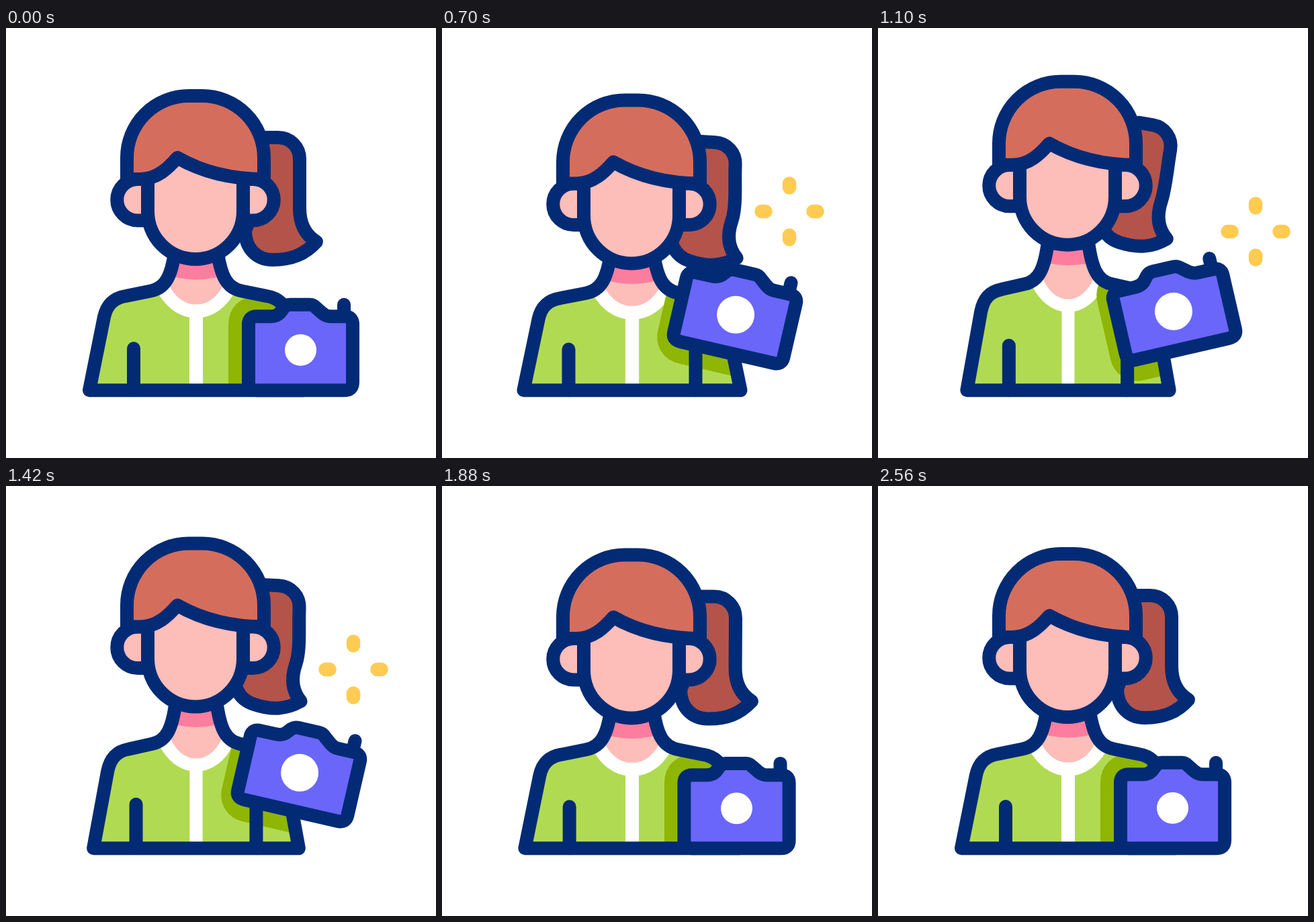
These frames come from a looping animation (640x640 px, 2.84 s). An HTML page with a canvas:

```html
<!DOCTYPE html>
<html lang="en">
<head>
<meta charset="utf-8">
<title>Photographer</title>
<style>
  html, body { margin: 0; width: 100%; height: 100%; overflow: hidden; background: #fff; }
  canvas { display: block; width: 100vw; height: 100vh; }
</style>
</head>
<body>
<canvas id="stage" width="640" height="640"></canvas>
<script>
const ctx = document.getElementById('stage').getContext('2d');
const LOOP = 2840, STEP = 20, LINE = 20, FLOOR = 539.3;
const COLOR = {
  ink: '#032b75', hair: '#d56d5d', tail: '#b4534a', skin: '#fdbdb9', blush: '#fd7d9f',
  shirt: '#b1da53', shade: '#8fb505', camera: '#6a66f9', flash: '#ffcb52', white: '#fff'
};

// [ms, crouch]: 1 is the deepest crouch, negative values stretch upwards.
const BOUNCE = [[220, 0], [460, 1], [700, 0.17], [1310, -0.7], [1665, 0.58], [2050, -0.34], [2540, 0]];
const CLICKS = [700, 1100, 1400];

const COLLAR = 'C245 408 262 421.5 283 421.5 S321 408 332 388';
const BODY = new Path2D(`M124 ${FLOOR} L146 430 C150 412 160 402 178 399 L215 391.5 C238 387 246 368 251 335` +
  `H315 C320 368 328 387 351 391.5 L388 399 C406 402 416 412 420 430 L442 ${FLOOR} Z`);
const SHIRT = new Path2D('M0 388 H234' + COLLAR + 'H640 V640 H0 Z');
const COLLAR_LINE = new Path2D('M234 388' + COLLAR + 'M283 421 V540');
const ARMS = new Path2D(`M190 477 V${FLOOR} M376 477 V${FLOOR}`);

// Centred on the camera body.
const CAMERA = new Path2D('M-65.5 -55 H-44 Q-36 -55 -31 -60 L-25 -68 Q-21 -72.5 -16 -72.5 H14' +
  'Q19 -72.5 23 -68 L32 -60 Q38 -55 44 -55 H65.5 Q77.5 -55 77.5 -43 V43 Q77.5 55 65.5 55' +
  'H-65.5 Q-77.5 55 -77.5 43 V-43 Q-77.5 -55 -65.5 -55 Z');
const BUTTON = new Path2D('M64.5 -72.5 V-55');

const radians = degrees => degrees * Math.PI / 180;
const clamp01 = v => Math.max(0, Math.min(1, v));
const mix = (a, b, k) => a + (b - a) * k;

function ease(t, from, to) {
  const u = clamp01((t - from) / (to - from));
  return u * u * (3 - 2 * u);
}

const pulse = (t, a, b, c, d) => ease(t, a, b) - ease(t, c, d);

// Smooth curve through the key points, level at each extreme.
function sample(keys, t) {
  const last = keys.length - 1;
  if (t <= keys[0][0]) return keys[0][1];
  if (t >= keys[last][0]) return keys[last][1];
  const i = keys.findIndex(key => key[0] > t) - 1;
  const slope = k => (keys[k + 1][1] - keys[k][1]) / (keys[k + 1][0] - keys[k][0]);
  const tangent = k => {
    if (k === 0 || k === last) return 0;
    const a = slope(k - 1), b = slope(k);
    return a * b <= 0 ? 0 : 2 * a * b / (a + b);
  };
  const [t0, v0] = keys[i], [t1, v1] = keys[i + 1];
  const d = t1 - t0, u = (t - t0) / d, u2 = u * u, u3 = u2 * u;
  return v0 + (v1 - v0) * (3 * u2 - 2 * u3) +
    d * (tangent(i) * (u3 - 2 * u2 + u) + tangent(i + 1) * (u3 - u2));
}

function pose(t) {
  const crouch = sample(BOUNCE, t);
  const raise = pulse(t, 460, 690, 1440, 1650);
  const lean = pulse(t, 860, 1070, 1200, 1370);
  const side = raise * (1 - 2 * lean);
  const recoil = (1 - raise) * crouch * (crouch < 0 ? 2.4 : 1);
  const restH = 1 - 0.09 * Math.tanh(2.5 * crouch);
  return {
    head: 38 * crouch,
    nod: 11 * recoil,
    width: 1 + 0.094 * crouch,
    height: 1 - 0.127 * crouch,
    swing: 8.5 * recoil + raise * (3 + 7 * lean),
    bend: 9 * recoil + raise * (16 - 8 * lean),
    camX: 438.5 - 2.5 * side,
    camY: mix(FLOOR - 55 * restH, 429 + 2.5 * side, raise),
    camW: mix(restH ** -0.85, 1.08, raise),
    camH: mix(restH, 0.96, raise),
    camTurn: 13 * side,
    lens: mix(23.5, 28, raise) - 6 * pulse(t, 220, 460, 460, 640)
  };
}

function place(path, matrix) {
  const placed = new Path2D();
  placed.addPath(path, matrix);
  return placed;
}

function fill(path, color) {
  ctx.fillStyle = color;
  ctx.fill(path);
}

function stroke(path, color = COLOR.ink, width = LINE) {
  ctx.strokeStyle = color;
  ctx.lineWidth = width;
  ctx.stroke(path);
}

function shape(path, color) {
  fill(path, color);
  stroke(path);
}

function rotate([x, y], cx, cy, degrees) {
  const c = Math.cos(radians(degrees)), s = Math.sin(radians(degrees));
  return [cx + (x - cx) * c - (y - cy) * s, cy + (x - cx) * s + (y - cy) * c];
}

function drawBody(p, shadow) {
  const matrix = new DOMMatrix([p.width, 0, 0, p.height, 283 * (1 - p.width), FLOOR * (1 - p.height)]);
  const body = place(BODY, matrix);
  const h = p.head;

  ctx.save();
  ctx.clip(body);
  fill(body, COLOR.skin);
  fill(new Path2D(`M230 ${300 + h} V${364 + h} Q283 ${385 + h} 336 ${364 + h} V${300 + h} Z`), COLOR.blush);
  fill(place(SHIRT, matrix), COLOR.shirt);
  stroke(place(COLLAR_LINE, matrix), COLOR.white, LINE * p.width);
  stroke(shadow, COLOR.shade, LINE * 3);
  fill(shadow, COLOR.shade);
  ctx.restore();

  stroke(place(ARMS, matrix));
  stroke(body);
}

function drawTail(p) {
  const top = (x, y) => {
    const [px, py] = rotate([x, y], 392, 188, p.swing);
    return [px, py + p.head];
  };
  const tip = (x, y) => top(...rotate([x, y], 400, 270, p.bend));
  const tail = new Path2D();
  tail.moveTo(...top(384, 163));
  tail.lineTo(...top(405, 163));
  tail.bezierCurveTo(...top(423, 163), ...top(437, 177), ...top(437, 195));
  tail.bezierCurveTo(...top(437, 220), ...tip(437, 245), ...tip(437, 268));
  tail.bezierCurveTo(...tip(437, 293), ...tip(447, 309), ...tip(462, 318));
  tail.bezierCurveTo(...tip(445, 337), ...tip(425, 345), ...tip(397, 345));
  tail.bezierCurveTo(...tip(372, 345), ...tip(356, 327), ...tip(356, 302));
  tail.lineTo(...top(376, 250));
  shape(tail, COLOR.tail);
}

function drawHead(p) {
  const h = p.head, brow = 225 + h + p.nod, peak = 193 + h + p.nod * 1.7;
  const ears = new Path2D(`M211 ${brow} H196 a30.75 30.75 0 0 0 0 61.5 H211 Z` +
    `M353 ${brow} H368 a30.75 30.75 0 0 1 0 61.5 H353 Z`);
  const face = new Path2D(`M211 ${brow - 28} V${272.5 + h} A71 71.5 0 0 0 353 ${272.5 + h} V${brow - 28}`);
  const hair = new Path2D(`M180 ${brow} V${193 + h} A92 92 0 0 1 272 ${101 + h} H292` +
    `A92 92 0 0 1 384 ${193 + h} V${brow} C330 ${brow} 290 ${peak + 20} 255 ${peak}` +
    `C242 ${peak + 15} 225 ${brow} 200 ${brow} Z`);
  shape(ears, COLOR.skin);
  shape(face, COLOR.skin);
  shape(hair, COLOR.hair);
}

function drawCamera(p, matrix) {
  stroke(place(BUTTON, matrix));
  shape(place(CAMERA, matrix), COLOR.camera);
  const { x, y } = matrix.transformPoint(new DOMPoint(0, -5));
  const lens = new Path2D();
  lens.arc(x, y, p.lens, 0, Math.PI * 2);
  fill(lens, COLOR.white);
}

function drawFlash(click, index, t) {
  const size = clamp01((90 - Math.abs(t - click)) / 50);
  if (size === 0) return;
  const x = index % 2 ? 562 : 517, y = index % 2 ? 303 : 273;
  const near = 35.5 * size, far = 41.5 * size;
  const rays = new Path2D();
  for (const [dx, dy] of [[1, 0], [0, 1], [-1, 0], [0, -1]]) {
    rays.moveTo(x + dx * near, y + dy * near);
    rays.lineTo(x + dx * far, y + dy * far);
  }
  stroke(rays, COLOR.flash, 20.5 * size);
}

function draw(t) {
  const p = pose(t);
  const tilted = new DOMMatrix().translate(p.camX, p.camY).rotate(p.camTurn);

  ctx.fillStyle = COLOR.white;
  ctx.fillRect(0, 0, 640, 640);
  ctx.lineCap = ctx.lineJoin = 'round';
  drawBody(p, place(CAMERA, tilted));
  drawTail(p);
  drawHead(p);
  drawCamera(p, tilted.scale(p.camW, p.camH));
  CLICKS.forEach((click, index) => drawFlash(click, index, t));
}

const begin = performance.now();
function tick() {
  const t = (performance.now() - begin) % LOOP;
  draw(Math.floor(t / STEP) * STEP);
  requestAnimationFrame(tick);
}
tick();
</script>
</body>
</html>
```
